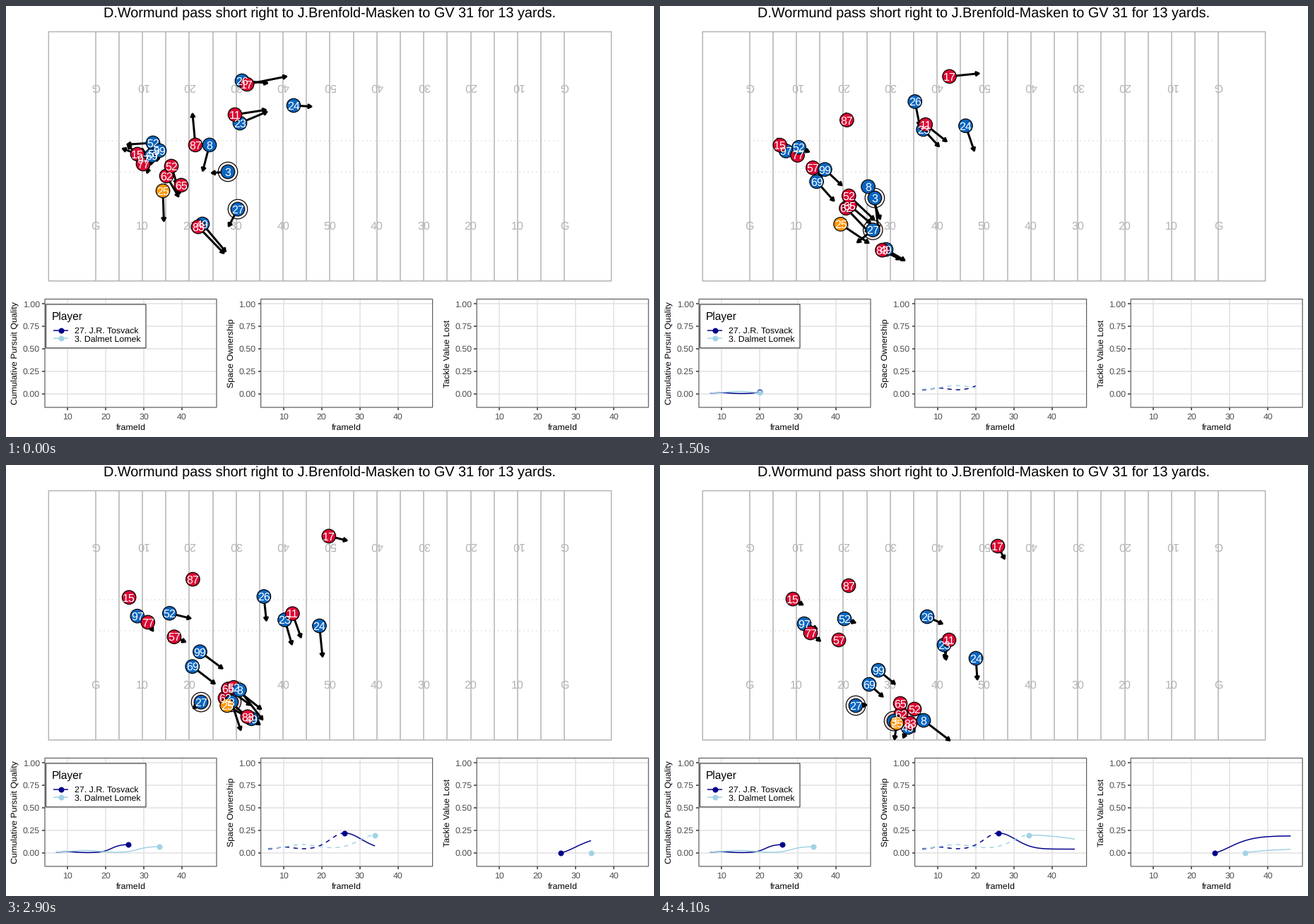
A matplotlib script for the animation above (4.2 s loop, 917 by 611 pixels).

```python
import numpy as np
import matplotlib.pyplot as plt
from matplotlib.animation import FuncAnimation
from matplotlib.collections import LineCollection, PolyCollection
from matplotlib.patches import Rectangle

plt.rcParams["font.family"] = "Liberation Sans"
plt.rcParams["text.hinting"] = "none"

W, H, DPI = 917, 611, 64
PT = 72 / DPI  # points per pixel
FIRST, LAST = 6, 46

RED, BLUE, ORANGE = "#DB0632", "#0A66C0", "#FF9505"
NAVY, SKY = "#00008B", "#A2D2E5"
FIELD, GRID, DARK, BORDER = "#B3B3B3", "#E1E1E1", "#333333", "#5C5C5C"

fig = plt.figure(figsize=(W / DPI, H / DPI), dpi=DPI, facecolor="white")
ax = fig.add_axes([0, 0, 1, 1])
ax.set_xlim(0, W)
ax.set_ylim(H, 0)
ax.axis("off")


# ---------- helpers ----------
def line(xs, ys, color, width=1.5, z=1, **kw):
    return ax.plot(xs, ys, color=color, lw=width * PT, zorder=z,
                   solid_capstyle="butt", dash_capstyle="butt", **kw)[0]


def box(x0, y0, x1, y1, color, width, z, face="none"):
    ax.add_patch(Rectangle((x0, y0), x1 - x0, y1 - y0, fc=face, ec=color,
                           lw=width * PT, zorder=z, snap=False))


def label(x, y, s, size, color="black", ha="center", rot=0, z=1):
    return ax.text(x, y, s, fontsize=size * PT, color=color, ha=ha,
                   va="baseline", rotation=rot, rotation_mode="anchor",
                   zorder=z)


def dot(color, z=9):
    return ax.plot([], [], "o", ms=8 * PT, mew=0, color=color, zorder=z)[0]


# ---------- field ----------
def yard_x(yard):
    return 60.3 + 6.636 * yard


label(458, 16, "D.Wormund pass short right to J.Brenfold-Masken to GV 31 for 13 yards.",
      19.85)
box(yard_x(0), 36.5, yard_x(120), 389.8, FIELD, 1.5, 1)
for yard in range(10, 111, 5):
    line([yard_x(yard)] * 2, [36.5, 389.8], FIELD)
for y in (191.2, 235):
    line([yard_x(10.8), yard_x(109.2)], [y, y], "#DCDCDC", z=0.9,
         linestyle=(0, (1, 3)))
for i in range(11):
    mark = str(10 * min(i, 10 - i)) if i % 10 else "G"
    x = yard_x(10 + 10 * i)
    label(x, 316.7, mark, 16, FIELD)
    label(x, 109.7, mark, 16, FIELD, rot=180)

# ---------- players ----------
KEYS = [6, 16, 38, 46]  # start, throw, tackle, end
players, paths = [], []


def run(number, color, *spots):
    """A smooth cubic run through four spots."""
    players.append((number, color))
    paths.append(np.linalg.solve(np.vander(np.array(KEYS, float)), spots))


run(26, BLUE, (334, 106), (357, 123), (367, 199), (378, 215))
run(17, RED, (341, 111), (392, 102), (466, 104), (478, 115))
run(24, BLUE, (407, 141), (427, 157), (445, 245), (447, 274))
run(23, BLUE, (331, 166), (363, 167), (398, 233), (402, 255))
run(11, RED, (324, 154), (363, 160), (409, 224), (409, 248))
run(87, RED, (268, 197), (265, 167), (265, 165), (267, 171))
run(97, BLUE, (194, 217), (180, 206), (191, 218), (204, 225))
run(15, RED, (186, 210), (172, 201), (178, 187), (188, 190))
run(57, RED, (209, 209), (212, 224), (244, 246), (253, 248))
run(77, RED, (194, 224), (194, 212), (204, 228), (213, 238))
run(52, BLUE, (208, 194), (193, 198), (243, 213), (261, 218))
run(69, BLUE, (206, 212), (213, 238), (276, 295), (296, 311))
run(99, BLUE, (217, 205), (225, 223), (287, 274), (309, 291))
run(62, RED, (227, 241), (251, 273), (322, 340), (341, 353))
run(65, RED, (248, 254), (258, 273), (326, 326), (340, 338))
run(52, RED, (234, 227), (254, 256), (337, 327), (360, 346))
run(8, BLUE, (288, 197), (289, 238), (344, 335), (373, 362))
run(3, BLUE, (314, 235), (303, 256), (324, 350), (331, 363))
run(49, BLUE, (278, 309), (309, 338), (351, 363), (351, 372))
run(83, RED, (272, 313), (304, 340), (347, 359), (354, 366))
run(25, ORANGE, (222, 262), (241, 298), (325, 349), (335, 366))
run(27, BLUE, (328, 288), (310, 310), (273, 339), (277, 341))
paths = np.array(paths)


def discs(count, size, z, colors):
    return ax.scatter(np.zeros(count), np.zeros(count), s=(size * PT) ** 2,
                      c=colors, edgecolors="black", linewidths=1.2 * PT,
                      zorder=z)


halos = discs(2, 27.5, 2, ["white"] * 2)
shafts = LineCollection([], colors="black", linewidths=3 * PT, zorder=3)
heads = PolyCollection([], facecolors="black", edgecolors="black",
                       linewidths=2.8 * PT, joinstyle="round", zorder=3)
ax.add_collection(shafts, autolim=False)
ax.add_collection(heads, autolim=False)
bodies = discs(len(players), 19.5, 4, [color for _, color in players])
numbers = [label(0, 0, str(n), 16, "white", z=5) for n, _ in players]
marked = [players.index((n, BLUE)) for n in (27, 3)]


def arrow_head(tip, vec):
    u = vec / max(np.hypot(*vec), 1e-6)
    side = np.array([-u[1], u[0]]) * 2.5
    back = tip - 4.3 * u
    return [tip, back + side, back - side]


# ---------- charts ----------
STEP = 305.6


def chart_x(t, panel):
    return 87 + STEP * panel + (t - 10) * 5.4


def chart_y(v):
    return 549.5 - 127.5 * v


TITLES = ["Cumulative Pursuit Quality", "Space Ownership", "Tackle Value Lost"]
for panel, title in enumerate(TITLES):
    left = 55 + STEP * panel
    right = left + 243
    for t in (10, 20, 30, 40):
        x = chart_x(t, panel)
        line([x, x], [415.5, 569], GRID)
        line([x, x], [569, 573], DARK)
        label(x, 586, str(t), 12.4, "#4D4D4D")
    for v in (0, 0.25, 0.5, 0.75, 1):
        y = chart_y(v)
        line([left, right], [y, y], GRID)
        line([left - 4, left], [y, y], DARK)
        label(left - 7, y + 4.4, f"{v:.2f}", 12.4, "#4D4D4D", "right")
    box(left, 415.5, right, 569, BORDER, 1.2, 6)
    label(left + 121.5, 601, "frameId", 12.4)
    label(left - 38.3, 492.5, title, 12.4, rot=90)

box(56.5, 423, 198, 484.8, DARK, 1.1, 10, "white")
label(65, 444.3, "Player", 15.5, ha="left", z=11)
for y, color, name in ((459.7, NAVY, "27. J.R. Tosvack"),
                       (471, SKY, "3. Dalmet Lomek")):
    line([67, 88], [y, y], color, z=11)
    dot(color, 12).set_data([77.5], [y])
    label(97, y + 4.4, name, 12.4, ha="left", z=11)


def bump(t, peak, height, rise, fall):
    return height * np.exp(-((t - peak) / np.where(t < peak, rise, fall)) ** 2)


def ramp(t, mid, height, width):
    return height / (1 + np.exp((mid - t) / width))


def settle(t, start, height, tau, power):
    return height * (1 - np.exp(-(np.maximum(t - start, 0) / tau) ** power))


pursuit = [lambda t: bump(t, 10, 0.01, 3, 3) + ramp(t, 21.5, 0.092, 1.2),
           lambda t: bump(t, 14.5, 0.024, 5.5, 5.5) + ramp(t, 28.3, 0.068, 1.5)]
space = [lambda t: 0.039 + bump(t, 10.5, 0.022, 3, 3) + bump(t, 26, 0.179, 5.2, 6.3),
         lambda t: 0.048 + bump(t, 15, 0.042, 5, 5) + bump(t, 34, 0.147, 5.8, 20)]
lost = [lambda t: settle(t, 26, 0.186, 6.95, 1.6),
        lambda t: settle(t, 34, 0.05, 9, 1)]

# strokes: line, curve, panel, first id, last id; pins: dot, curve, panel, id
strokes, pins, runners = [], [], []
for who, (color, stop) in enumerate(((NAVY, 26), (SKY, 34))):
    def stroke(curve, panel, a, b, style="-"):
        strokes.append((line([], [], color, z=7, linestyle=style),
                        curve, panel, a, b))

    stroke(pursuit[who], 0, 7, stop)
    stroke(space[who], 1, FIRST, stop, (0, (4, 4)))
    stroke(space[who], 1, stop, LAST)
    stroke(lost[who], 2, stop, LAST)
    runners.append((dot(color), pursuit[who], stop))
    for curve, panel in ((space[who], 1), (lost[who], 2)):
        pins.append((dot(color), curve, panel, stop))


def place(artist, t, curve, panel, visible):
    t = np.atleast_1d(t) if visible else np.array([])
    artist.set_data(chart_x(t, panel), chart_y(curve(t)))


def update(n):
    now = FIRST + max(0, n - 1)  # the opening pose is held twice as long
    pos = np.array([now ** 3, now ** 2, now, 1]) @ paths
    vec = np.array([3 * now ** 2, 2 * now, 1, 0]) @ paths * 10  # one second ahead
    tips = pos + vec
    shafts.set_segments(np.stack([pos, tips], axis=1))
    heads.set_verts([arrow_head(t, v) for t, v in zip(tips, vec)])
    bodies.set_offsets(pos)
    for text, (x, y) in zip(numbers, pos):
        text.set_position((x, y + 5.7))
    halos.set_offsets(pos[marked])
    owned = [float(f(now)) for f in space]
    halos.set_facecolor([(1, 1 - v, 1 - 1.2 * v) for v in owned])

    for artist, curve, panel, a, b in strokes:
        place(artist, np.linspace(a, min(now, b), 120), curve, panel, now > a)
    for artist, curve, stop in runners:
        place(artist, min(now, stop), curve, 0, now >= 7)
    for artist, curve, panel, stop in pins:
        place(artist, stop, curve, panel, now >= stop)
    return []


anim = FuncAnimation(fig, update, frames=42, interval=100, repeat=True,
                     repeat_delay=0, blit=False)
plt.show()
```
